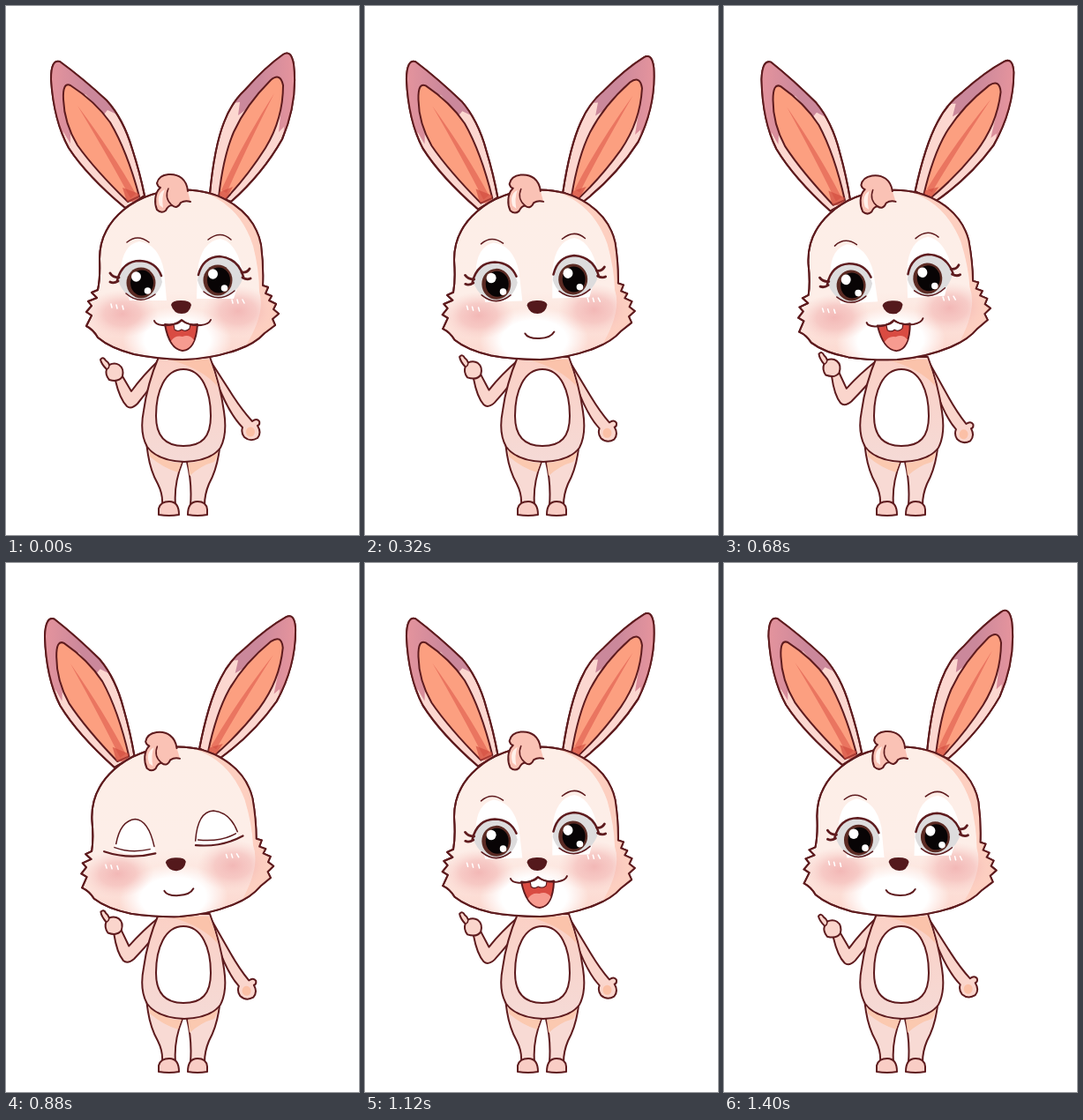
Animation of 400x600 px, one loop 1440 ms. Source, as an HTML page:

```html
<!DOCTYPE html>
<html lang="en">
<head>
<meta charset="utf-8">
<title>Talking rabbit</title>
<style>
  html, body { margin: 0; width: 100%; height: 100%; overflow: hidden; background: #fff; }
  svg { display: block; width: 100%; height: 100%; }
  .line { fill: none; }
  .thin { fill: none; stroke-width: 1.5; }
  .flat { stroke: none; }
</style>
</head>
<body>
<svg viewBox="0 0 400 600" stroke="#5e1b1e" stroke-width="2" stroke-linecap="round" stroke-linejoin="round">
  <defs>
    <radialGradient id="blush">
      <stop offset="0" stop-color="#efa8a8" stop-opacity=".75"/>
      <stop offset=".5" stop-color="#f2b3b1" stop-opacity=".55"/>
      <stop offset="1" stop-color="#f8cdc8" stop-opacity="0"/>
    </radialGradient>
    <radialGradient id="muzzle">
      <stop offset=".6" stop-color="#fff"/>
      <stop offset="1" stop-color="#fff" stop-opacity="0"/>
    </radialGradient>
    <linearGradient id="skin" x1="0" y1="0" x2="0" y2="1">
      <stop offset="0" stop-color="#fdeee7"/>
      <stop offset=".6" stop-color="#fdeee8"/>
      <stop offset="1" stop-color="#fcd6cd"/>
    </linearGradient>
    <linearGradient id="fur" x1="0" y1="0" x2="0" y2="1">
      <stop offset="0" stop-color="#fbd0c5"/>
      <stop offset="1" stop-color="#f5dad6"/>
    </linearGradient>
    <linearGradient id="tipL">
      <stop offset=".1" stop-color="#e5949d"/>
      <stop offset=".6" stop-color="#cb889b"/>
    </linearGradient>
    <linearGradient id="tipR">
      <stop offset=".4" stop-color="#cb889b"/>
      <stop offset=".85" stop-color="#e5949d"/>
    </linearGradient>
    <path id="face" d="M200 208.500C148 209 106 242 106 287Q107 308 104 322L97 325L103 331L93 335L97 340L91 347L97 351L91 363Q99 367 104 376Q118 388 145 395Q170 400 200 401Q234 400 262 390Q282 383 293 371L305 362L302 355L309 349L303 344L306 338L298 334L301 329L294 326L297 319L291 317Q292 295 289 271C282 234 245 208 200 208.500Z"/>
    <path id="earL" d="M135 229Q92 193 71 161Q54 130 51 83Q51 60 61 63Q87 82 114 107Q133 128 143 162Q152 190 157 215Z"/>
    <path id="earR" d="M231 213Q236 160 247 132Q255 110 271 95Q294 69 314 55Q323 49 326 66Q331 108 313 151Q291 190 255 222Z"/>
    <clipPath id="inFace"><use href="#face"/></clipPath>
    <clipPath id="inEarL"><use href="#earL"/></clipPath>
    <clipPath id="inEarR"><use href="#earR"/></clipPath>
    <g id="iris" class="flat">
      <ellipse rx="16.500" ry="17.500" fill="#5b2b24"/>
      <ellipse cx="1" rx="13" ry="14.500" fill="#080405"/>
      <ellipse cx="-5.500" cy="-7" rx="5.500" ry="5.800" fill="#fff"/>
      <circle cx="7.500" cy="9" r="3.800" fill="#fff"/>
    </g>
  </defs>

  <g id="armL">
    <path fill="#fad5cc" d="M174 401Q155 419 142 437L132 420L124 425Q129 446 137 454Q142 458 149 451Q158 440 168 426Z"/>
    <path fill="#fad5cc" d="M117 424Q112 418 114 412Q108 406 107 401Q110 397 113 402Q116 404 117 407Q123 404 128 407Q134 411 132 420Q128 427 117 424Z"/>
    <path class="thin" d="M114 412Q117 411 117 407"/>
  </g>
  <g id="armR">
    <path fill="#fad5cc" d="M230 400Q246 425 257 442Q268 459 279 471Q284 467 287 471Q288 475 285 476Q290 484 285 490Q277 495 270 489Q266 484 268 478Q254 464 241 432Z"/>
    <ellipse class="flat" cx="277" cy="483" rx="5" ry="5.500" fill="#fbc0a6"/>
  </g>

  <path fill="#f8dad4" d="M159 492Q161 523 172 542Q178 554 177 566H192Q190 542 200 517Z"/>
  <path fill="#f8dad4" d="M243 492Q241 522 230 542Q225 554 225 566H209Q211 541 205 517Z"/>
  <path class="flat" fill="#fbc9b0" d="M162 501Q179 519 199 518L195 529Q178 524 163 511ZM206 518Q226 518 241 502Q239 513 236 517Q221 521 208 533Z"/>
  <path fill="#f9cdc5" d="M173 577V570Q175 562 185 562Q196 562 196 577Q185 579 173 577ZM206 577Q206 562 217 562Q227 562 228 571V577Q217 579 206 577Z"/>
  <path fill="url(#fur)" d="M173 398Q160 429 156 459Q151 484 160 500Q172 516 202 517Q232 516 243 501Q251 486 247 460Q243 430 231 398Z"/>
  <path class="flat" fill="#fbc3ab" d="M185 401H230Q237 416 240 432Q224 412 185 401Z"/>
  <path fill="#fff" d="M201 412C180 412 170 437 170 465C170 489 181 499 201 499C222 499 232 489 232 465C232 437 222 412 201 412Z"/>

  <g id="head">
    <g id="leftEar">
      <use href="#earL" fill="#fcd7d0"/>
      <path class="flat" clip-path="url(#inEarL)" fill="url(#tipL)" d="M40 45H75L130 125L115 118L111 123L90 100L73 120V156L65 143L63 150L45 130Z"/>
      <use href="#earL" class="line"/>
      <path fill="#fc9f80" d="M138 222Q101 186 81 158Q66 133 65 106Q64 86 73 90Q101 108 118 132Q137 164 151 216Z"/>
      <path class="flat" fill="#ea7560" d="M81 113Q122 168 147 213L141 218Q116 171 81 113Z"/>
      <path class="flat" fill="#cf4a3e" d="M132 206L151 213L150 222L137 222Z" opacity=".65"/>
    </g>
    <g id="rightEar">
      <use href="#earR" fill="#fcd7d0"/>
      <path class="flat" clip-path="url(#inEarR)" fill="url(#tipR)" d="M340 40H300L250 111L265 109L263 124L274 116L300 87L313 105L309 143L315 137L314 154L340 120Z"/>
      <use href="#earR" class="line"/>
      <path fill="#fc9f80" d="M241 217Q246 171 258 143Q272 112 300 84Q311 75 314 90Q314 128 294 161Q273 194 248 220Z"/>
      <path class="flat" fill="#ea7560" d="M304 99Q267 157 244 209L250 212Q270 166 304 99Z"/>
      <path class="flat" fill="#cf4a3e" d="M242 211L257 205L248 222H240Z" opacity=".65"/>
    </g>

    <use href="#face" fill="url(#skin)"/>
    <g class="flat" clip-path="url(#inFace)">
      <path fill="#fdcfc0" d="M204 206Q262 216 280 272Q287 300 287 324Q295 350 268 391L320 370V230L260 200Z"/>
      <ellipse cx="194" cy="379" rx="62" ry="38" fill="url(#muzzle)"/>
      <ellipse cx="132" cy="349" rx="41" ry="27" fill="url(#blush)"/>
      <ellipse cx="263" cy="346" rx="41" ry="29" fill="url(#blush)"/>
    </g>
    <path class="line" stroke="#fff" stroke-width="1.5" d="M119 338L120 342M125 339L126 343M132 340L133 344M256 333L257 337M262 333L263 337M268 333L270 337"/>
    <use href="#face" class="line"/>

    <path class="flat" fill="#fac2b5" d="M206 210C205 197 196 190 184 191Q173 192 171 201Q172 205 175 206C168 212 168 224 171 231Q176 236 181 232Q184 226 188 226Q194 231 198 223Q203 220 209 222Z"/>
    <path class="flat" fill="#fff0ea" d="M174 226Q170 213 180 208Q176 217 178 229Z"/>
    <path class="line" d="M206 210C205 197 196 190 184 191Q173 192 171 201Q172 205 175 206C168 212 168 224 171 231Q176 236 181 232Q184 226 188 226Q194 231 198 223Q203 220 209 222"/>
    <path class="thin" d="M188 226Q179 218 184 207"/>

    <g id="eyesOpen">
      <path class="flat" fill="#fff" d="M130 300Q132 271 151 267Q173 270 179 300L182 334H140ZM216 332L217 300Q221 267 243 264Q261 268 268 300L258 332Z"/>
      <path class="thin" d="M137 268Q149 258 162 268M229 265Q243 254 255 265"/>
      <path class="flat" fill="#dddcdd" d="M127 311Q132 289 152 289Q172 290 177 313Q172 332 153 333Q134 332 127 311ZM217 311Q220 286 242 284Q264 286 269 307Q262 329 241 331Q222 330 217 311Z"/>
      <use href="#iris" x="153" y="314"/>
      <use href="#iris" x="240" y="311"/>
      <path class="line" stroke-width="2.500" d="M126 311Q132 289 152 289Q170 290 176 306M218 305Q223 285 242 284Q263 286 269 307"/>
      <path class="line" stroke-width="2.800" d="M128 308Q121 308 118 303M127 312Q122 315 118 313M267 302Q273 303 276 298M268 308Q273 311 277 309"/>
      <path class="thin" stroke-width="1" d="M136 326Q152 340 169 327M224 324Q241 338 259 323"/>
    </g>
    <g id="eyesShut">
      <path class="flat" fill="#fff" d="M130 322Q136 289 155 288Q172 291 176 326Q150 332 130 322ZM221 320Q225 285 244 283Q264 286 271 314Q246 326 221 320Z"/>
      <path class="thin" d="M132 315Q138 289 155 288Q170 290 175 320M222 316Q226 283 244 283Q263 286 270 308"/>
      <path class="line" stroke-width="2.200" d="M118 323Q146 334 176 328M222 321Q251 325 276 313"/>
      <path class="thin" d="M130 319Q148 327 170 323M225 315Q250 319 268 310"/>
    </g>

    <path class="flat" fill="#54191c" d="M187 339Q188 334 198 334Q209 334 210 339Q208 349 199 349Q190 349 187 339Z"/>
    <g id="mouthOpen">
      <path fill="#d94b42" d="M180 361Q190 363 199 357Q208 363 217 361Q215 390 200 391Q185 389 180 361Z"/>
      <path class="flat" fill="#f79b90" d="M187 380Q192 373 200 375Q208 372 213 379Q208 390 200 390Q192 389 187 380Z"/>
      <path fill="#fff" stroke-width="1.200" d="M190 361L191 367Q195 370 199 367Q204 370 208 366L209 361Q203 360 199 357Q195 361 190 361Z"/>
      <path class="line" d="M168 357Q169 361 177 362Q191 363 199 356Q207 363 221 362Q230 361 232 356"/>
    </g>
    <path id="mouthShut" class="line" d="M184 371Q187 377 200 377Q213 377 217 370"/>
  </g>
</svg>
<script>
  const STEP = 40, STEPS = 36;
  const part = id => document.getElementById(id);
  const turn = (id, angle, x, y) => part(id).setAttribute('transform', `rotate(${angle} ${x} ${y})`);
  const show = (id, on) => part(id).setAttribute('display', on ? 'inline' : 'none');

  function draw(now) {
    const step = Math.floor(now / STEP) % STEPS;
    const time = step * STEP;
    const sway = 1 - Math.abs(step / 18 - 1);

    turn('head', -3.6 * sway, 200, 465);
    turn('leftEar', 6.1 * sway, 142, 222);
    turn('rightEar', 10.8 * sway, 240, 216);
    turn('armL', 6 * sway, 172, 403);
    turn('armR', 4 * sway, 232, 402);

    const talking = time % 480 < 240;
    show('mouthOpen', talking);
    show('mouthShut', !talking);

    const blink = time >= 800 && time < 960;
    show('eyesOpen', !blink);
    show('eyesShut', blink);
  }

  const start = performance.now();
  (function loop() {
    draw(performance.now() - start);
    requestAnimationFrame(loop);
  })();
</script>
</body>
</html>
```
